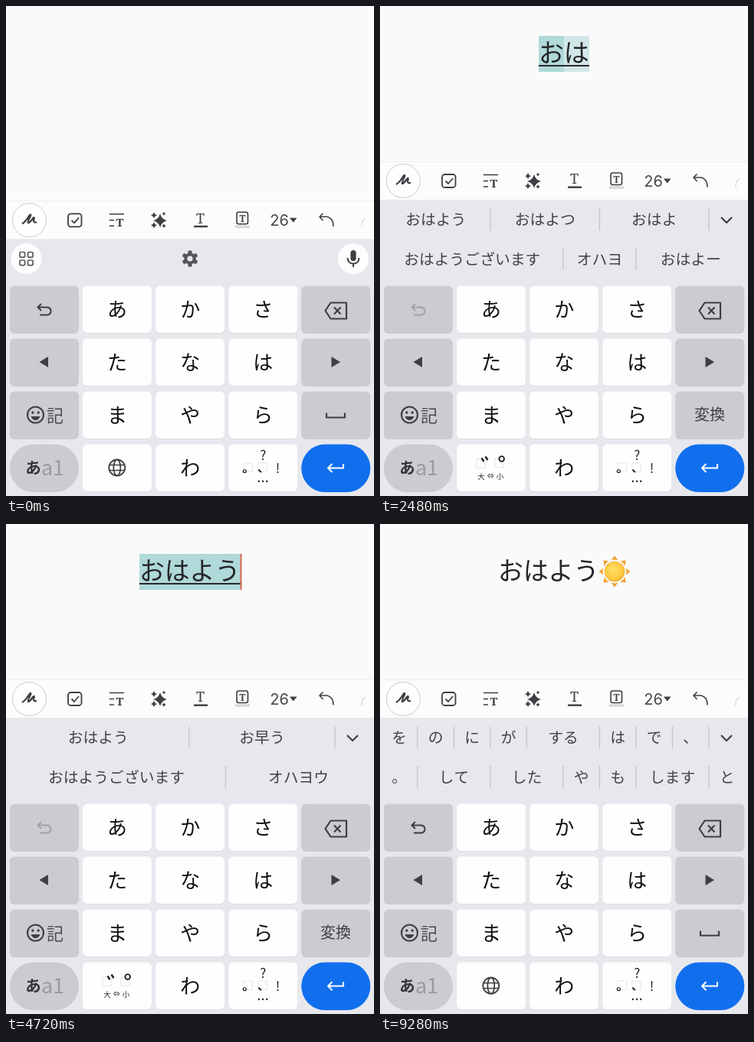
An HTML page with a canvas for the animation above (9360 ms loop, 480 px wide and 640 px high).

```html
<!DOCTYPE html>
<html lang="ja">
<head>
<meta charset="utf-8">
<style>
html, body { margin: 0; width: 100%; height: 100%; overflow: hidden; background: #fafafa; }
canvas { display: block; width: 480px; height: 640px; }
</style>
</head>
<body>
<canvas id="stage" width="480" height="640"></canvas>
<script>
const ctx = document.getElementById('stage').getContext('2d');
const LOOP = 9360;
const SANS = '"Noto Sans CJK JP", "Noto Sans CJK", "Noto Sans", sans-serif';
const INK = '#3e3e43', SOFT = '#c5c6cc';

// Typing steps: time, text, index of the suggestion set
const steps = [
  { at: 0, word: '', set: -1 },
  { at: 1110, word: 'お', set: 0 },
  { at: 1600, word: 'おは', set: 1 },
  { at: 2560, word: 'おはよ', set: 1 },
  { at: 3200, word: 'おはよう', set: 2 },
  { at: 4880, word: 'おはよう', set: 3, done: true }
];
const cursorOn = [[80, 720], [1110, 2240], [2560, 3840], [4280, 5520],
  [6040, 6720], [7120, 7840], [8160, 8800]];

// Each suggestion may end with the number of columns it spans
const sets = [
  ['おはよう3 お願いします3 終わら3', '小書き2 お 御 尾 大 オ 俺 雄 親'],
  ['おはよう3 おはよつ3 おはよ3', 'おはようございます5 オハヨ2 おはよー3'],
  ['おはよう5 お早う4', 'おはようございます6 オハヨウ4'],
  ['を の に が する2 は で 、', '。 して2 した2 や も します2 と']
].map(rows => rows.map(row => row.split(' ').map(s => {
  const [, label, span] = s.match(/^(\D+)(\d?)$/);
  return { label, span: +span || 1 };
})));

function text(s, x, y, size, color = INK, weight = 400, font = SANS) {
  ctx.font = `${weight} ${size}px ${font}`;
  ctx.textAlign = 'center';
  ctx.fillStyle = color;
  ctx.fillText(s, x, y + size * 0.375);
}

function line(d, width = 2, color = INK) {
  ctx.strokeStyle = color;
  ctx.lineWidth = width;
  ctx.stroke(new Path2D(d));
}

function fill(d, color = INK) {
  ctx.fillStyle = color;
  ctx.fill(new Path2D(d));
}

function rect(x, y, w, h, color) {
  ctx.fillStyle = color;
  ctx.fillRect(x, y, w, h);
}

function round(x, y, w, h, r, color, stroke) {
  ctx.beginPath();
  ctx.roundRect(x, y, w, h, r);
  if (stroke) {
    ctx.strokeStyle = color;
    ctx.lineWidth = stroke;
    ctx.stroke();
  } else {
    ctx.fillStyle = color;
    ctx.fill();
  }
}

function disc(x, y, r, color, stroke) {
  round(x - r, y - r, 2 * r, 2 * r, r, color, stroke);
}

function star(x, y, r) {
  const q = r * 0.2;
  fill(`M${x} ${y - r}Q${x + q} ${y - q} ${x + r} ${y}Q${x + q} ${y + q} ${x} ${y + r}` +
    `Q${x - q} ${y + q} ${x - r} ${y}Q${x - q} ${y - q} ${x} ${y - r}Z`);
}

function sun(x, y) {
  ctx.save();
  ctx.translate(x, y);
  for (let i = 0; i < 8; i++) {
    fill('M-4.5 -14.5L0 -20.5L4.5 -14.5Q0 -16.5 -4.5 -14.5Z', '#f0a02c');
    ctx.rotate(Math.PI / 4);
  }
  const glow = ctx.createRadialGradient(-3, -3, 2, 0, 0, 14);
  glow.addColorStop(0, '#ffdc62');
  glow.addColorStop(0.75, '#fdc93f');
  glow.addColorStop(1, '#f3aa32');
  disc(0, 0, 13.3, glow);
  ctx.restore();
}

function cursorAlpha(t) {
  for (const [on, off] of cursorOn) {
    if (t >= on && t < off + 80) return t < off ? 1 : 1 - (t - off) / 80;
  }
  return 0;
}

function note(t, step) {
  const { word, done } = step;
  const w = word.length * 33;
  const left = done ? 154 : 240 - w / 2;
  if (w && !done) {
    rect(left, 39, w, 47, '#b0d9d9');
    if (word.length === 2) rect(240, 39, 33, 47, '#d2e7e8');
    rect(left, 77, w, 2, '#29292c');
  }
  [...word].forEach((c, i) => text(c, left + 16.5 + i * 32.8, 61, 33, '#252529', 500));
  if (done) sun(306, 62);
  ctx.globalAlpha = cursorAlpha(t);
  rect(done ? 325 : left + w - 0.5, 39, 2, 47, '#d4694c');
  ctx.globalAlpha = 1;
}

function toolbar(dy) {
  ctx.save();
  ctx.translate(0, dy);
  rect(0, 203, 480, 50, '#fcfcfc');
  rect(0, 203, 480, 1, '#eeeeef');
  disc(30.5, 228.5, 22, '#fefefe');
  disc(30.5, 228.5, 22, '#cbcbcd', 1);
  line('M21 233Q25 231 30 223Q33 219 32 223Q28 231 29 232Q31 232 35 226Q38 223 36 229Q36 232 40 231', 2.3);
  round(81, 220, 17.5, 17, 3.5, INK, 1.8);
  line('M85.5 228.5L89 232L95 225', 1.8);
  line('M135 220.5H154M135 228.5H141M135 236H141', 1.6);
  text('T', 148.5, 231.5, 15, INK, 600, '"Noto Serif", serif');
  star(201, 229, 9);
  star(193, 222, 4);
  star(206, 220, 2.5);
  star(193, 235, 4);
  star(206, 236, 2.8);
  text('T', 253.5, 225.5, 18, INK, 500, '"Noto Serif", serif');
  rect(245, 235.5, 18, 2.4, INK);
  round(301, 218, 14.5, 15.5, 2.5, INK, 1.6);
  text('T', 308.3, 226, 12, INK, 600, '"Noto Serif", serif');
  round(299.5, 236, 18, 2, 0.5, '#aaaaad', 0.8);
  text('26', 356.5, 228.5, 20, '#47474b', 400, 'Inter, Roboto, sans-serif');
  fill('M370 225.5H379.5L374.7 231.5Z');
  line('M413.5 219.5L409 224L413.5 229M409.5 224H419Q427 226 427 236.5', 1.6);
  line('M469 226Q463 229 464 237', 1.2, '#d3d3d6');
  ctx.restore();
}

function suggestions(rows) {
  rows.forEach((row, r) => {
    const y = 279 + r * 51.5;
    let x = 1.5;
    row.forEach(({ label, span }) => {
      const w = span * 47.5;
      if (label === '小書き') {
        text('お', 26.5, 332, 17);
        text(label, 75, 343, 11);
      } else {
        text(label, x + w / 2, y, 19.8, '#424247');
      }
      x += w;
      if (x < 470) rect(x - 0.8, y - 14.5, 1.4, 29, SOFT);
    });
  });
  line('M445 276L452 283L459 276', 2.2);
}

function tools() {
  disc(26.5, 330, 20, '#fdfdfe');
  for (const x of [18, 28.5]) for (const y of [321.5, 332]) round(x, y, 6.6, 6.6, 1.2, '#58585d', 1.7);
  ctx.save();
  ctx.translate(240, 330);
  for (let i = 0; i < 6; i++) {
    fill('M-3 -5L-2.3 -10.5H2.3L3 -5Z', '#55555a');
    ctx.rotate(Math.PI / 3);
  }
  disc(0, 0, 5.6, '#55555a', 4);
  ctx.restore();
  disc(453, 330, 20, '#fdfdfe');
  round(449.4, 319, 7.2, 14, 3.6, INK);
  line('M445.5 329Q446 336.5 453 336.5Q460 336.5 460.5 329M453 336.5V341', 2);
}

function dashedBox(x, y) {
  ctx.setLineDash([2, 1]);
  round(x, y, 11.5, 11.5, 0, '#d2d2d4', 0.8);
  ctx.setLineDash([]);
}

function keys(composing) {
  const kana = 'あかさたなはまやら わ';
  for (let row = 0; row < 4; row++) {
    for (let col = 0; col < 5; col++) {
      const x = 5 + col * 95.1, y = 365.5 + row * 69;
      const side = col === 0 || col === 4;
      const pill = side && row === 3;
      const color = pill && col === 4 ? '#116fee' : side ? '#cbcbd2' : '#fefefe';
      round(x, y + 1, 89.8, 61.5, pill ? 31 : 6, side ? color : '#dcdce1');
      round(x, y, 89.8, 61.5, pill ? 31 : 6, color);
      const c = kana[row * 3 + col - 1];
      if (!side && c && c !== ' ') text(c, x + 45, y + 31, 26, '#101012');
    }
  }

  line('M46 389L41.5 393.5L46 398M42 393.5H53.5Q58.5 394 58.5 398.5Q58.5 403 53.5 403.5H44',
    2, composing ? '#a2a2a8' : INK);
  line('M416.5 398L423.5 387.5H444V408.5H423.5Z', 2.2);
  line('M428 393.5L436.5 402.5M436.5 393.5L428 402.5', 2.2);
  fill('M43.5 465L55 458V472Z');
  fill('M436 465L424.5 458V472Z');

  disc(38.5, 534, 10.5, INK, 2.1);
  disc(34.8, 531, 1.7, INK);
  disc(42.2, 531, 1.7, INK);
  fill('M32.5 536H44.5Q42.5 541 38.5 541Q34.5 541 32.5 536Z');
  text('記', 64, 534.5, 22, '#4b4b50');
  if (composing) text('変換', 430, 533.5, 20, INK);
  else line('M418 531.5V537.5H442V531.5', 2.2);

  text('あ', 35.5, 603, 20.5, '#333338', 700);
  text('a1', 61, 603, 27, '#9a9aa1', 300);
  line('M425.5 598L420 603.5L425.5 609M420.5 603.5H440V598', 2.1, '#ffffff');

  if (composing) {
    dashedBox(126, 591.5);
    dashedBox(150, 591.5);
    line('M132.5 590.5L135.5 595M137.5 588.5L140.5 593', 2.3, '#1d1d20');
    disc(158.7, 591.5, 3.3, '#1d1d20', 1.8);
    text('大', 132, 614.5, 9.5, '#27272a');
    text('⇔', 144.3, 614, 9, '#27272a');
    text('小', 156.5, 614.5, 9.5, '#27272a');
  } else {
    disc(144.8, 603, 10.5, INK, 1.8);
    line('M134.8 599.5H154.8M134.8 606.5H154.8', 1.7);
    ctx.beginPath();
    ctx.ellipse(144.8, 603, 4.5, 10.5, 0, 0, 7);
    ctx.stroke();
  }

  dashedBox(310, 597);
  dashedBox(328.8, 597);
  text('?', 335.3, 587, 17, '#202023');
  disc(311.3, 607.5, 2, '#202023', 1.2);
  line('M329.3 605.5L332.8 609', 1.8, '#202023');
  text('!', 354.5, 604, 17, '#202023');
  for (const x of [329.8, 335, 340.2]) disc(x, 620.7, 1.2, '#202023');
}

function draw(t) {
  const step = steps.findLast(s => t >= s.at);
  const open = step.set >= 0;
  const composing = open && !step.done;
  ctx.lineCap = 'butt';
  ctx.lineJoin = 'round';
  rect(0, 0, 480, 640, '#fafafa');
  note(t, step);
  rect(0, open ? 252.5 : 304, 480, 400, '#e7e8ed');
  toolbar(open ? 0 : 51.3);
  if (open) suggestions(sets[step.set]);
  else tools();
  keys(composing);
}

const start = performance.now();
function tick() {
  draw((performance.now() - start) % LOOP);
  requestAnimationFrame(tick);
}
tick();
</script>
</body>
</html>
```
